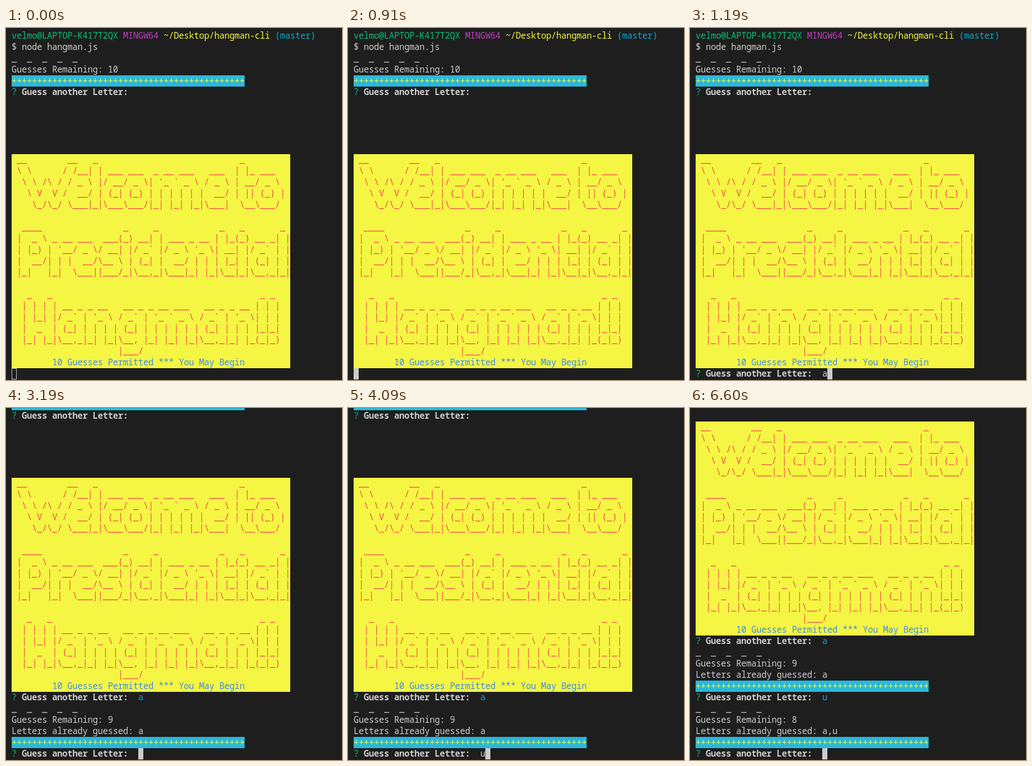
An HTML page with a canvas that plays this animation: 597x625 px, repeating every 8000 ms.

```html
<!DOCTYPE html>
<html lang="en">
<head>
<meta charset="utf-8">
<title>Hangman CLI</title>
<style>
  html, body { margin: 0; width: 100%; height: 100%; overflow: hidden; background: #1e1e1e; }
  canvas { display: block; }
</style>
</head>
<body>
<canvas id="term" width="597" height="625"></canvas>
<script>
const ctx = document.getElementById("term").getContext("2d", { alpha: false });
const CELL = 9, ROW = 20, LEFT = 10, TOP = 4, BASELINE = 15;
const LAST_ROW = 30, INPUT_COL = 25, LOOP = 8000;
const FONT = '15.5px "Noto Sans Mono", "DejaVu Sans Mono", monospace';
const C = {
  bg: "#1e1e1e", text: "#cccccc", green: "#0dbc79", magenta: "#bc3fbc",
  path: "#f5f543", cyan: "#11a8cd", bar: "#29b8db", yellow: "#f5f543",
  red: "#f14c4c", blue: "#3b8eea"
};

// "~" stands for a backtick in the banner
const BANNER = String.raw`
 __        __   _                            _
 \ \      / /__| | ___ ___  _ __ ___   ___  | |_ ___
  \ \ /\ / / _ \ |/ __/ _ \| '_ ~ _ \ / _ \ | __/ _ \
   \ V  V /  __/ | (_| (_) | | | | | |  __/ | || (_) |
    \_/\_/ \___|_|\___\___/|_| |_| |_|\___|  \__\___/

  ____                _     _            _   _       _
 |  _ \ _ __ ___  ___(_) __| | ___ _ __ | |_(_) __ _| |
 | |_) | '__/ _ \/ __| |/ _~ |/ _ \ '_ \| __| |/ _~ | |
 |  __/| | |  __/\__ \ | (_| |  __/ | | | |_| | (_| | |
 |_|   |_|  \___||___/_|\__,_|\___|_| |_|\__|_|\__,_|_|

   _   _                                         _ _
  | | | | __ _ _ __   __ _ _ __ ___   __ _ _ __ | | |
  | |_| |/ _~ | '_ \ / _~ | '_ ~ _ \ / _~ | '_ \| | |
  |  _  | (_| | | | | (_| | | | | | | (_| | | | |_|_|
  |_| |_|\__,_|_| |_|\__, |_| |_| |_|\__,_|_| |_(_|_)
                     |___/`.slice(1).replaceAll("~", "`").split("\n");

const span = (col, text, color = C.text, weight = 500) => ({ col, text, color, weight });
const line = (...spans) => ({ spans });
const filled = (width, fill, ...spans) => ({ spans, width, fill });
const bar = () => filled(46, C.bar, span(0, "+".repeat(46), C.yellow));
const ask = (answer = "", color = C.cyan) => line(
  span(0, "?", C.green),
  span(2, "Guess another Letter:", C.text, 700),
  span(INPUT_COL, answer, color)
);
const status = (left, guessed) => [
  line(span(0, "_  _  _  _  _")),
  line(span(0, "Guesses Remaining: " + left)),
  ...(guessed ? [line(span(0, "Letters already guessed: " + guessed))] : []),
  bar()
];

const intro = [
  line(
    span(0, "velmo@LAPTOP-K417T2QX", C.green),
    span(22, "MINGW64", C.magenta),
    span(30, "~/Desktop/hangman-cli", C.path),
    span(52, "(master)", C.cyan)
  ),
  line(span(0, "$ node hangman.js")),
  ...status(10),
  ask(),
  ...Array.from({ length: 5 }, () => line()),
  ...BANNER.map(text => filled(55, C.yellow, span(0, text, C.red))),
  filled(55, C.yellow, span(8, "10 Guesses Permitted *** You May Begin", C.blue))
];
const round1 = [...intro, ask("a"), ...status(9, "a")];
const round2 = [...round1, ask("u"), ...status(8, "a,u")];

const steps = [
  { at: 0, lines: intro, scroll: 0, cursor: 0, hollow: true },
  { at: 500, lines: intro, scroll: 0, cursor: 0 },
  { at: 1190, lines: [...intro, ask("a", C.text)], scroll: 0, cursor: INPUT_COL + 1 },
  { at: 1850, lines: [...round1, ask()], scroll: 5, cursor: INPUT_COL },
  { at: 4090, lines: [...round1, ask("u", C.text)], scroll: 5, cursor: INPUT_COL + 1 },
  { at: 4500, lines: [...round2, ask()], scroll: 10, cursor: INPUT_COL }
];

function drawLine({ spans, width, fill }, y) {
  if (fill) {
    ctx.fillStyle = fill;
    ctx.fillRect(LEFT, y, width * CELL, ROW);
  }
  for (const { col, text, color, weight } of spans) {
    ctx.font = weight + " " + FONT;
    ctx.fillStyle = color;
    // one glyph per terminal cell
    [...text].forEach((ch, i) => ctx.fillText(ch, LEFT + (col + i) * CELL, y + BASELINE));
  }
}

function drawCursor(col, hollow) {
  const x = LEFT + col * CELL, y = TOP + LAST_ROW * ROW;
  ctx.fillStyle = ctx.strokeStyle = C.text;
  if (hollow) ctx.strokeRect(x + 0.5, y + 0.5, CELL - 1, ROW - 1);
  else ctx.fillRect(x, y, CELL, ROW);
}

function draw(step) {
  ctx.fillStyle = C.bg;
  ctx.fillRect(0, 0, 597, 625);
  step.lines.forEach((l, i) => drawLine(l, TOP + (i - step.scroll) * ROW));
  drawCursor(step.cursor, step.hollow);
}

const start = performance.now();
function tick() {
  const time = (performance.now() - start) % LOOP;
  draw(steps.findLast(s => s.at <= time));
  requestAnimationFrame(tick);
}
tick();
</script>
</body>
</html>
```
